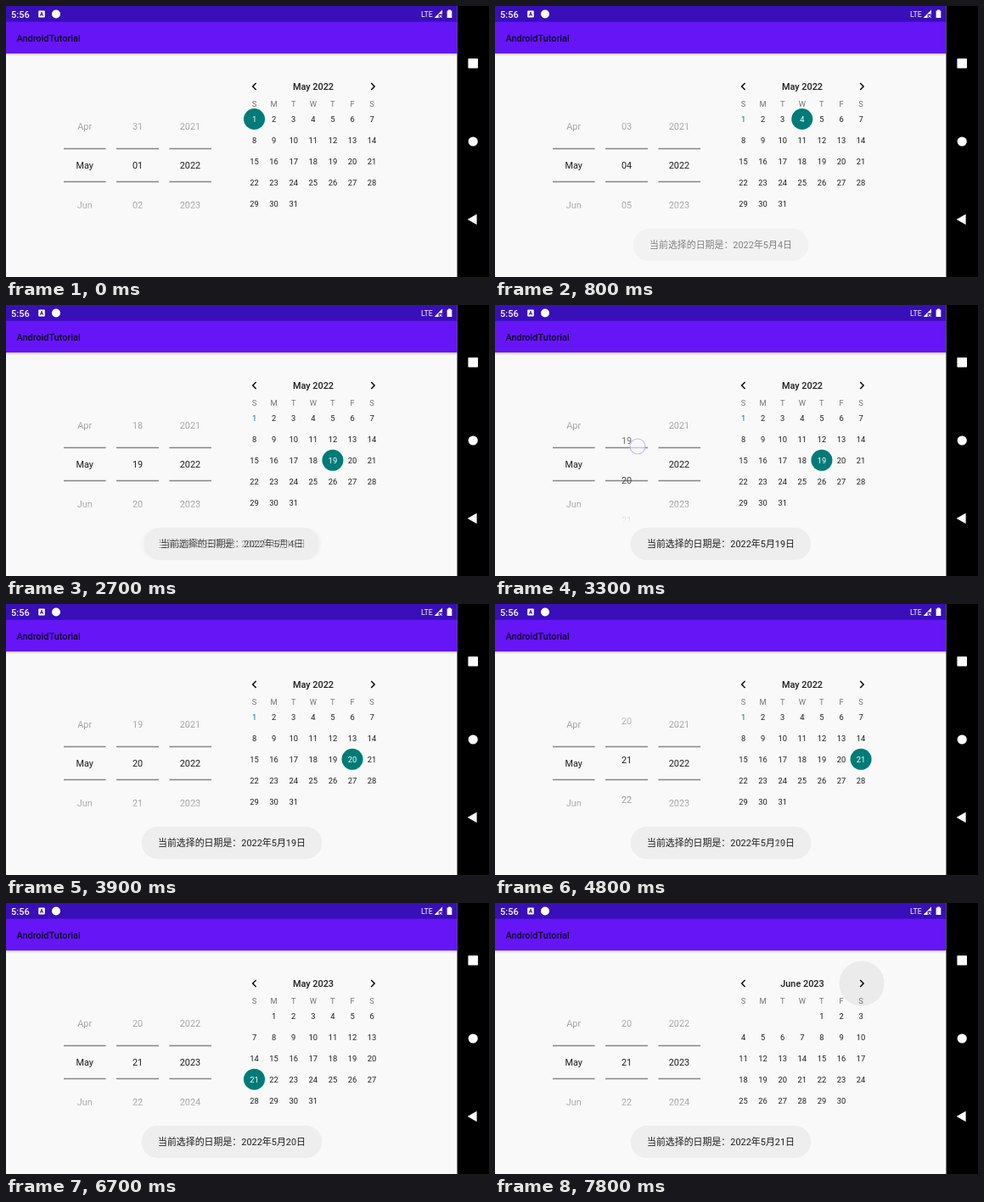
An HTML page for the animation above (8 s loop, 569x320 px).

```html
<!DOCTYPE html>
<html lang="zh-CN">
<head>
<meta charset="utf-8">
<title>Date picker</title>
<style>
  html, body { margin: 0; width: 100%; height: 100%; overflow: hidden; background: #f9f9f9; }
  svg { display: block; width: 569px; height: 320px; }
  text { font-family: Roboto, "Noto Sans CJK SC", "Noto Sans CJK", sans-serif; fill: #1d1d1d; white-space: pre; }
  .medium { font-weight: 500; }
</style>
</head>
<body>
<svg id="stage" viewBox="0 0 569 320" xmlns="http://www.w3.org/2000/svg">
  <defs>
    <linearGradient id="fade" gradientUnits="userSpaceOnUse" x1="0" y1="118.5" x2="0" y2="258.5">
      <stop offset="0" stop-color="#fff" stop-opacity="0"/>
      <stop offset=".46" stop-color="#fff"/>
      <stop offset=".54" stop-color="#fff"/>
      <stop offset="1" stop-color="#fff" stop-opacity="0"/>
    </linearGradient>
    <linearGradient id="shade" x1="0" y1="0" x2="0" y2="1">
      <stop offset="0" stop-opacity=".22"/>
      <stop offset="1" stop-opacity="0"/>
    </linearGradient>
    <mask id="wheelMask" maskUnits="userSpaceOnUse" x="60" y="118" width="190" height="141">
      <rect x="60" y="118.5" width="190" height="140" fill="url(#fade)"/>
    </mask>
    <clipPath id="pager"><rect x="280" y="80" width="164" height="170"/></clipPath>
  </defs>

  <rect width="569" height="320" fill="#f9f9f9"/>
  <rect y="56" width="531.5" height="3" fill="url(#shade)"/>
  <rect y="18" width="531.5" height="38" fill="#6515f6"/>
  <rect width="531.5" height="18.7" fill="#380fb8"/>

  <g id="status" fill="#fff">
    <rect x="38.2" y="5.6" width="7.6" height="7.8" rx="1"/>
    <path d="M40.3 11.7 42 7.3 43.7 11.7M40.9 10.4H43.1" fill="none" stroke="#380fb8"/>
    <circle cx="59" cy="9.5" r="5"/>
    <path d="M504.6 14 514 4.6V9.6H509.6V14Z"/>
    <path d="M510.6 10.8 513.6 13.8M513.6 10.8 510.6 13.8" stroke="#fff"/>
    <path d="M521 4.6H524V5.5H525.3V14H519.6V5.5H521Z"/>
  </g>

  <rect x="531.5" width="37.5" height="320"/>
  <g fill="#fff">
    <rect x="544.4" y="61.9" width="11.6" height="11.6" rx=".8"/>
    <circle cx="550.2" cy="160" r="5.6"/>
    <path d="M543.6 252 554.6 245.8V258.2Z"/>
  </g>

  <path d="M68 168.4H117.6M130 168.4H180M192.4 168.4H242M68 207.4H117.6M130 207.4H180M192.4 207.4H242"
        stroke="#858585" stroke-width="1.5"/>
  <g id="wheels" mask="url(#wheelMask)"></g>

  <circle id="nextRipple" cx="432" cy="95" r="0" fill="#ebebeb"/>
  <g id="months" clip-path="url(#pager)"></g>
  <path d="M294.6 91 290.7 95 294.6 99M430.2 91 434.1 95 430.2 99" fill="none" stroke="#111" stroke-width="1.6"/>
  <g id="toasts"></g>
  <circle id="touch" r="9" fill="#f6f5fc" fill-opacity=".6" stroke="#b7b1de" stroke-opacity=".8" stroke-width="1.2"/>
</svg>

<script>
const LOOP = 8000, FRAME = 100;
const PITCH = 46.8, MIDDLE = 188.5;
const TEAL = '#007b77', INK = '#1d1d1d';
const $ = id => document.getElementById(id);
const clamp = (v, lo = 0, hi = 1) => Math.min(hi, Math.max(lo, v));

function add(parent, tag, attrs) {
  const el = document.createElementNS('http://www.w3.org/2000/svg', tag);
  for (const k in attrs) el.setAttribute(k, attrs[k]);
  return parent.appendChild(el);
}

// Text whose capitals are centred on y
function label(parent, str, x, y, size, attrs = {}) {
  const el = add(parent, 'text', { x, y: y + size * 0.355, 'font-size': size, 'text-anchor': 'middle', ...attrs });
  el.textContent = str;
  return el;
}

const show = (el, on) => el.setAttribute('visibility', on ? 'inherit' : 'hidden');

label($('status'), '5:56', 6, 9.7, 11, { 'text-anchor': 'start', class: 'medium', style: 'fill:#fff' });
label($('status'), 'LTE', 489, 9.6, 8.7, { 'text-anchor': 'start', style: 'fill:#fff' });
label($('stage'), 'AndroidTutorial', 12.5, 38, 10.9, { 'text-anchor': 'start', class: 'medium', style: 'fill:#0c0420' });

// Wheels
function makeWheel(x, format) {
  const items = [-2, -1, 0, 1, 2].map(() => label($('wheels'), '', x, 0, 10.9));
  return pos => {
    const base = Math.round(pos);
    items.forEach((el, i) => {
      const n = base + i - 2;
      el.textContent = format(n);
      el.setAttribute('y', MIDDLE + (n - pos) * PITCH + 3.87);
    });
  };
}
const MONTHS = ['Jan', 'Feb', 'Mar', 'Apr', 'May', 'Jun', 'Jul'];
makeWheel(92.7, n => MONTHS[n])(4);
const dayWheel = makeWheel(155, n => String((n + 30) % 31 + 1).padStart(2, '0'));
const yearWheel = makeWheel(217, n => n);

// Calendar pages
const colX = c => 292.5 + c * 23.1;
const rowY = r => 133.7 + r * 24.9;

function makeMonth(title, year, month) {
  const g = add($('months'), 'g', {});
  const first = new Date(year, month, 1).getDay();
  const count = new Date(year, month + 1, 0).getDate();
  const dot = add(g, 'circle', { r: 12.5 });
  label(g, title, 362, 95, 10.9, { class: 'medium' });
  [...'SMTWTFS'].forEach((s, c) => label(g, s, colX(c), 115.6, 9.33, { style: 'fill:#757575' }));
  const place = d => [colX((first + d - 1) % 7), rowY(Math.floor((first + d - 1) / 7))];
  const days = Array.from({ length: count }, (_, i) => label(g, i + 1, ...place(i + 1), 9.33));
  return { g, dot, place, days };
}
const may22 = makeMonth('May 2022', 2022, 4);
const may23 = makeMonth('May 2023', 2023, 4);
const june23 = makeMonth('June 2023', 2023, 5);

function mark(m, selected, pressed, today) {
  const at = pressed || selected;
  const [x, y] = m.place(at || 1);
  show(m.dot, at);
  m.dot.setAttribute('cx', x);
  m.dot.setAttribute('cy', y - 0.2);
  m.dot.setAttribute('fill', pressed ? '#d8d8d8' : TEAL);
  m.days.forEach((el, i) => {
    const d = i + 1;
    el.style.fill = d === selected && !pressed ? '#fff' : d === today ? TEAL : INK;
  });
}

// Toasts, each fading in over the one before
const toasts = [[620, 4], [2580, 19], [4640, 20], [6660, 21]].map(([start, day]) => {
  const g = add($('toasts'), 'g', {});
  const w = day < 10 ? 206.5 : 212.5;
  add(g, 'rect', { x: 266 - w / 2, y: 263, width: w, height: 38.2, rx: 19.1, fill: '#eeeeee' });
  label(g, `当前选择的日期是：2022年5月${day}日`, 266, 282.3, 10.93);
  return { g, start };
});

// Values sampled once per frame, held at both ends
const sample = (t, start, list) => list[clamp(Math.round((t - start) / FRAME), 0, list.length - 1)];

const firstDrag = t => sample(t, 3100, [0, 13, 28.4, 42, 43.5, 45, 46, 46.5, PITCH]) / PITCH;
const secondDrag = t => sample(t, 4300, [0, 0, 14, 34, 52, 50.8, 49.5, 48.3, 47.4, PITCH]) / PITCH;
const yearDrag = t => sample(t, 5200, [0, 2, 15, 32, 41, 43.4, 45, 46, 46.5, PITCH]) / PITCH;

// Finger: start time, x, y per frame
const touches = [
  [500, 364, [134, 134]],
  [2000, 387.6, [183.7, 183.7]],
  [3000, 168, [201, 195, 182, 167, 153]],
  [4300, 157, [198, 192, 178, 158, 139]],
  [5200, 217, [239, 232, 219, 202]],
  [7400, 432, [95, 95]]
];

function render(t) {
  const day = t < 600 ? 1 : t < 2100 ? 4 : 19 + firstDrag(t) + secondDrag(t);
  const year = 2022 + yearDrag(t);
  dayWheel(day);
  yearWheel(year - 1 + 1);

  // A value counts once its wheel is most of the way there
  const selected = Math.floor(day + 0.23);
  const nextYear = Math.floor(year + 0.23) > 2022;
  const pressed = t === 500 ? 4 : t === 2000 ? 19 : 0;
  const slide = t < 7500 ? 0 : 1 - (1 - clamp((t - 7500) / 260)) ** 3;

  mark(may22, selected, pressed, 1);
  mark(may23, selected, 0, 0);
  mark(june23, 0, 0, 0);
  show(may22.g, !nextYear);
  show(may23.g, nextYear && slide < 1);
  show(june23.g, slide > 0);
  for (const m of [may22, may23, june23]) if (m.g.getAttribute('visibility') === 'hidden') show(m.dot, false), m.dot.setAttribute('visibility', 'hidden');
  may23.g.setAttribute('transform', `translate(${-164 * slide})`);
  june23.g.setAttribute('transform', `translate(${164 * (1 - slide)})`);

  $('nextRipple').setAttribute('r', t < 7400 ? 0 : Math.min(26.5, 10 + (t - 7400) * 0.08));

  const alphas = toasts.map(o => clamp((t - o.start) / 330));
  toasts.forEach((o, i) => {
    o.g.setAttribute('opacity', alphas[i]);
    show(o.g, alphas[i] > 0 && !(alphas[i + 1] >= 1));
  });

  const finger = touches.find(([from, , ys]) => t >= from && t < from + ys.length * FRAME);
  show($('touch'), finger);
  if (finger) {
    $('touch').setAttribute('cx', finger[1]);
    $('touch').setAttribute('cy', sample(t, finger[0], finger[2]));
  }
}

function tick() {
  render(Math.floor(performance.now() % LOOP / FRAME) * FRAME);
  requestAnimationFrame(tick);
}
render(0);
requestAnimationFrame(tick);
</script>
</body>
</html>
```
